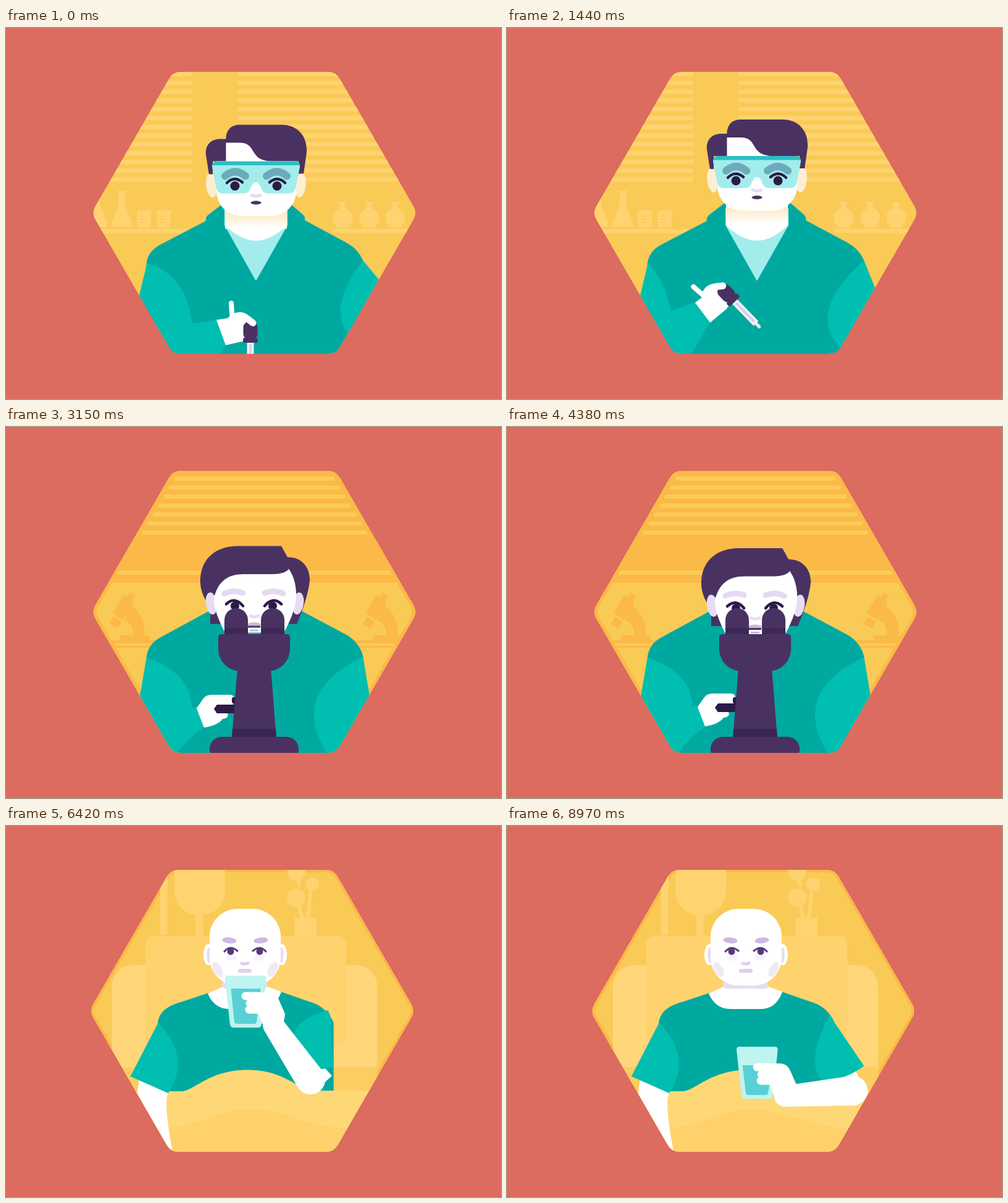
An HTML page with a canvas for the animation above (9000 ms loop, 800 px wide and 600 px high).

```html
<!DOCTYPE html>
<html lang="en">
<head>
<meta charset="utf-8">
<title>Lab story</title>
<style>
html, body { margin: 0; width: 100%; height: 100%; overflow: hidden; background: #dc6b60; }
canvas { display: block; }
</style>
</head>
<body>
<canvas id="stage" width="800" height="600"></canvas>
<script>
const ctx = document.getElementById('stage').getContext('2d');
const LOOP = 9000;
const C = {
  back: '#dc6b60', yellow: '#f9ca56', light: '#fed370', orange: '#fbb947',
  teal: '#00a9a0', mint: '#00beb0', hair: '#493262', ink: '#2e1a47',
  cyan: '#a2edec', lilac: '#e6dcf3', white: '#ffffff'
};

const smooth = u => u * u * (3 - 2 * u);
const lerp = (a, b, u) => a + (b - a) * u;
const ease = (t, from, to) => smooth(Math.min(1, Math.max(0, (t - from) / (to - from))));
const mix = (a, b, u) => a.map((v, i) => lerp(v, b[i], u));

function fill(color, d) {
  ctx.fillStyle = color;
  ctx.fill(new Path2D(d));
}
function line(color, width, d, cap = 'round') {
  ctx.strokeStyle = color;
  ctx.lineWidth = width;
  ctx.lineCap = cap;
  ctx.lineJoin = 'round';
  ctx.stroke(new Path2D(d));
}
function rect(color, x, y, w, h, r = 0) {
  ctx.fillStyle = color;
  ctx.beginPath();
  ctx.roundRect(x, y, w, h, r);
  ctx.fill();
}
function oval(color, x, y, rx, ry = rx, a = 0) {
  ctx.fillStyle = color;
  ctx.beginPath();
  ctx.ellipse(x, y, rx, ry, a, 0, 7);
  ctx.fill();
}
function group(x, y, deg, draw) {
  ctx.save();
  ctx.translate(x, y);
  ctx.rotate(deg * Math.PI / 180);
  draw();
  ctx.restore();
}
function mirror(axis, draw) {
  draw();
  ctx.save();
  ctx.translate(2 * axis, 0);
  ctx.scale(-1, 1);
  draw();
  ctx.restore();
}
// tapered limb between two round joints
function limb(color, x1, y1, r1, x2, y2, r2) {
  const a = Math.atan2(y2 - y1, x2 - x1);
  const k = Math.acos((r1 - r2) / Math.hypot(x2 - x1, y2 - y1));
  ctx.fillStyle = color;
  ctx.beginPath();
  ctx.arc(x1, y1, r1, a + k, a - k + 2 * Math.PI);
  ctx.arc(x2, y2, r2, a - k, a + k);
  ctx.fill();
}

function hexPath(cx, sx) {
  const p = new Path2D(), R = 263.3;
  const corner = i => [R * Math.cos(i * Math.PI / 3), R * Math.sin(i * Math.PI / 3)];
  p.moveTo(...mix(corner(5), corner(0), 0.5));
  for (let i = 0; i < 6; i++) p.arcTo(...corner(i), ...corner(i + 1), 22);
  p.closePath();
  const out = new Path2D();
  out.addPath(p, new DOMMatrix([sx, 0, 0, 1, cx, 299]));
  return out;
}

function rim(face, width) {
  ctx.strokeStyle = C.orange;
  ctx.lineWidth = width * 2;
  ctx.stroke(face);
}

// ---------- scientist with dropper ----------
function labShelf() {
  for (let i = 0; i < 13; i++) {
    const y = 71 + 14.2 * i;
    rect(C.light, 0, y, 301, 7);
    rect(C.light, 374, y, 400, 7);
  }
  rect(C.light, 0, 325, 294, 7);
  rect(C.light, 528, 325, 200, 7);
  for (const x of [147, 187]) {
    group(x, 263, 0, () => {
      fill(C.light, 'M-7 0H7V4H5V22L17 54Q18 59 14 59H-14Q-18 59-17 54L-5 22V4H-7Z');
    });
  }
  for (const x of [211, 243]) {
    fill(C.light, `M${x} 295h26l-3 5v19q0 4-4 4h-14q-4 0-4-4v-19z`);
    for (let i = 0; i < 3; i++) rect(C.yellow, x + 6, 303 + i * 5, i % 2 ? 9 : 6, 2);
  }
  for (const x of [544, 587, 629]) {
    oval(C.light, x, 307, 16);
    rect(C.light, x - 4.5, 282, 9, 14);
    rect(C.light, x - 6, 281, 12, 3, 1);
    rect(C.light, x - 10, 316, 20, 7, 2);
  }
}

function goggledHead() {
  mirror(404, () => oval('#fdeed2', 332, 246, 8.5, 20, -0.12));
  rect(C.white, 340, 175, 129, 120.5, [0, 0, 40, 40]);
  fill(C.hair, 'M328 228L323 196C322 180 332 171 346 171H355.5C355.5 157 364 148 377 148H445C472 148 487 167 486 192L481 227H473V207H428C404 206 402 193 395 184Q389 177 379 177H355.5V207H334V228Z');
  const lens = 'M342 207H466Q475 207 475 216L468 251Q466 259 457 259H424C409 259 414 241 404 241C394 241 399 259 384 259H351Q342 259 340 251L333 216Q333 207 342 207Z';
  fill(C.cyan, lens);
  ctx.save();
  ctx.clip(new Path2D(lens));
  rect('#2bbfc3', 330, 207, 150, 6.5);
  ctx.restore();
  mirror(404, () => {
    line('#6daabc', 12, 'M354 231Q370 217 387 231');
    line(C.ink, 4.5, 'M357 242Q369 230 382 241');
    oval(C.ink, 370, 247, 7.5);
  });
  line(C.lilac, 5, 'M397 262Q404 265 411 262');
  oval(C.hair, 404, 274, 8.5, 3);
}

function dropperHand(x, y, deg, cuff) {
  const a = deg * Math.PI / 180, cs = Math.cos(a), sn = Math.sin(a);
  const world = (u, v) => `${x + u * cs - v * sn} ${y + u * sn + v * cs}`;
  fill(C.white, `M${cuff[0]} ${cuff[1]}L${world(-28, -24)}L${world(-6, 14)}L${world(-18, 16)}L${cuff[2]} ${cuff[3]}Z`);
  group(x, y, deg, () => {
    line(C.white, 8, 'M-31-47L-29-20');
    fill(C.white, 'M-38-22L-28-30Q-15-36-4-28L0-10L-6 12Q-15 18-25 12Z');
    rect('#f5f1f8', -5.5, 15, 11, 51);
    rect('#dacfe6', -2, 20, 4, 42);
    rect('#f5f1f8', -2.5, 65, 5, 11, 2);
    rect(C.hair, -11.5, -17, 23, 29, 9);
    rect(C.hair, -12, 9, 24, 8, 3);
    line(C.white, 11, 'M-16-25L-5-22L4-15');
  });
}

// right arm: control, end; left arm: control, end, cuff top, cuff bottom
const lab = {
  right: [[514, 456, 560, 503], [455, 463, 521, 530]],
  left: [
    [290, 398, 301, 478, 340, 472, 355, 513],
    [280, 395, 294, 466, 323, 460, 341, 495],
    [230, 415, 240, 450, 287, 430, 317, 460]
  ],
  hand: [[395, 492, 0], [376, 474, -6], [339, 392, -78]]
};

function labScene(t) {
  const lift = ease(t, 0, 780), swing = ease(t, 780, 2050);
  const pose = ([a, b, c]) => mix(mix(a, b, lift), c, swing);
  rect(C.yellow, 0, 0, 800, 600);
  labShelf();
  fill(C.teal, 'M353 282L327 302Q322 306 323 312L250 350Q229 361 227 381L212 540H577V376Q569 357 550 347L483 311Q484 305 479 301L457 282Z');
  const r = mix(...lab.right, swing);
  fill(C.mint, `M577 376Q${r.join(' ')}V545H640V${452 + 150 * swing}Z`);

  fill(C.cyan, 'M353 292H455V319L404 409L353 319Z');
  fill(C.white, 'M354 285H454V319Q428 344 404 344Q380 344 354 319Z');
  const dy = 8.5 * (1 - ease(t, 0, 700));
  const shade = ctx.createLinearGradient(0, 294 + dy, 0, 316 + dy);
  shade.addColorStop(0, '#fdecca');
  shade.addColorStop(1, C.white);
  ctx.fillStyle = shade;
  ctx.fillRect(354, 290, 100, 26 + dy);
  group(0, dy, 0, goggledHead);

  const s = pose(lab.left), cuff = s.slice(4);
  fill(C.mint, `M228 380Q${s.slice(0, 4).join(' ')}L${cuff.join(' ')}L${cuff[2] - 0.6 * (545 - cuff[3])} 545H188Z`);
  dropperHand(...pose(lab.hand), cuff);
}

// ---------- scientist at microscope ----------
function smallScope(x) {
  group(x, 0, 0, () => {
    line(C.orange, 10, 'M204 270L199 279', 'butt');
    line(C.orange, 20, 'M198 277L181 307', 'butt');
    line(C.orange, 15, 'M181 311L174 322', 'butt');
    fill(C.orange, 'M202 289Q226 304 224 340H205Q207 317 191 313Z');
    rect(C.orange, 184, 337, 48, 8);
  });
}

function scopeHead() {
  fill(C.hair, 'M330 322V293C319 282 313 264 314 249C316 216 339 196 375 196H445L455 214C478 214 491 230 491 251Q488 280 470 322Z');
  mirror(402, () => oval(C.lilac, 332, 289, 9, 18, -0.15));
  fill(C.white, 'M336 280C343 253 358 241.5 384 241.5H432Q451 241 457 233Q469 250 469 276Q469 300 449 336H354Q335 300 336 280Z');
  mirror(400.5, () => {
    line('#e4daf1', 9, 'M353 273Q368 266 383 272');
    line(C.ink, 4.5, 'M356 290Q370 277 383 293');
    oval(C.ink, 370, 293, 7);
  });
  line(C.lilac, 5, 'M395 309Q401 312 408 309');
  oval('#c9bada', 401, 323, 11, 3.5);
  rect(C.hair, 391, 325, 20, 3);
  rect('#c9bada', 394, 331, 14, 3);
}

function scopeScene(t, face) {
  const pale = '#fccb58';
  rect(C.yellow, 0, 0, 800, 600);
  rect(C.orange, 0, 0, 800, 252);
  for (let i = 0; i < 7; i++) {
    const x = 272 - 8.7 * i;
    rect(pale, x, 80 + 14.5 * i, 803 - 2 * x, 7, 3);
  }
  rect(pale, 0, 232, 800, 7);
  smallScope(0);
  smallScope(409);
  rect(C.orange, 0, 345, 800, 5);
  rect(C.orange, 0, 354, 800, 3);
  rim(face, 5);

  fill(C.teal, 'M331 296L250 340Q229 351 227 373L210 540H595L577 371Q572 350 552 337L475 296Z');
  fill(C.mint, 'M577 372Q455 430 521 532H604Z');
  const turn = Math.sin((t - 4380) / 260);
  fill(C.mint, `M227 373Q299 398 300 453L309 ${452 + turn}L321 ${484 + turn}Q297 500 274 530H200Z`);

  group(0, 4 * Math.sin((t - 4380) / 600), 0, scopeHead);

  group(0, 2 * turn, 0, () => {
    fill(C.white, 'M308 453L319 437Q323 431 333 431H362Q369 431 369 438L366 448H340V461H358Q361 469 350 470Q342 481 320 484Z');
    fill(C.ink, 'M341 447H374V461H341L336 454Z');
  });
  rect(C.ink, 365, 437, 8, 10, 3);

  for (const x of [353, 412]) {
    rect(C.hair, x, 293, 38, 44, [19, 19, 0, 0]);
    rect('#3d2856', x, 325, 38, 10);
  }
  fill(C.hair, 'M374 390H428L437 505H365Z');
  fill('#3b2753', 'M366 488H436L437 501H365Z');
  rect(C.hair, 343, 335, 116, 60, [5, 5, 36, 36]);
  rect(C.hair, 329, 501, 144, 40, 20);
}

// ---------- patient on the sofa ----------
function room(face) {
  rect(C.yellow, 0, 0, 800, 600);
  rim(face, 4);
  rect(C.light, 249, 60, 12, 116);
  rect(C.light, 272, 40, 82, 104, 38);
  rect(C.light, 306, 140, 13, 38);
  oval(C.light, 469, 74, 14.5);
  oval(C.light, 495, 94, 11);
  oval(C.light, 469, 116, 15);
  line(C.light, 6, 'M472 85L474 96M473 126L479 150M492 108L488 150');
  rect(C.light, 466, 148, 36, 30);
  rect('#ffd679', 171, 225, 429, 190, 34);
  rect('#fccd60', 171, 390, 429, 45);
  rect('#fed26d', 225, 178, 325, 174, 13);
}

function patientHead() {
  const violet = '#573a7e', soft = '#ddd0ec';
  mirror(386.5, () => {
    oval(C.white, 327, 208, 8, 17);
    oval(C.lilac, 328, 209, 3.5, 13);
  });
  rect(C.white, 329, 134, 115, 124, 45);
  mirror(386.5, () => {
    oval('#f0eaf7', 342, 232, 7, 13, -0.5);
    oval('#f7f3fb', 364, 213, 9, 5);
    oval('#cdb9e3', 361, 185, 11.5, 4.8, 0.1);
    line(violet, 3, 'M353 203Q362 192 374 202');
    oval(violet, 363, 203, 5.5);
  });
  line(soft, 5, 'M381 222Q386 224 391 222');
  rect(soft, 375, 231, 22, 6.5, 3);
}

// control, cuff inner, cuff outer, elbow control, wrist
const resting = [
  [312, 377, 281, 428, 220, 412, 290, 475, 308],
  [300, 375, 262, 432, 201, 405, 254, 448, 270]
];

function restingArm(t) {
  const [qx, qy, ax, ay, bx, by, ex, ey, wx] = mix(...resting, ease(t, 5500, 5950));
  fill(C.white, `M${bx + 14} ${by + 5}L${ax} ${ay}Q${ex} ${ey} ${wx} 530H258L${bx + 11} 434Z`);
  fill(C.mint, `M246 318Q${qx} ${qy} ${ax} ${ay}L${bx} ${by}Z`);
}

function glass(level) {
  fill('#bff4f0', 'M4 0H62Q67 0 66.5 5L59 79Q58 84 53 84H14Q9 84 8 79L0 5Q0 0 4 0Z');
  fill('#58d0d5', `M9.5 ${level}H57.5L51 75Q50 78 47 78H20Q16 78 15 75Z`);
}

function gripHand() {
  fill(C.white, 'M38 27H72Q82 28 87 39L97 62L93 86L60 78L54 62L40 58Z');
  line(C.white, 13, 'M33 33H52M40 45H56M39 55H56');
}

function openHand() {
  limb(C.white, 76, 78, 15, 78, 66, 12);
  line(C.white, 10, 'M72 74L57 63M78 70L86 33M87 72L101 40');
}

// glass, elbow, shoulder, sleeve control, cuff inner, cuff outer
const arm = {
  reach: [494, 275, 522, 438, 528, 318, 457, 377, 498, 427, 549, 383],
  away: [590, 230, 595, 415, 528, 312, 470, 365, 505, 415, 575, 365],
  sip: [354, 242, 492, 410, 520, 298, 422, 326, 500, 390, 528, 390],
  tilt: [353, 234, 584, 388, 522, 300, 480, 345, 505, 390, 580, 354],
  rest: [371, 357, 559, 428, 522, 305, 479, 384, 512, 414, 577, 388]
};

function drinkingArm(t) {
  let v = mix(arm.reach, arm.away, ease(t, 5520, 5800));
  v = mix(v, arm.sip, ease(t, 5800, 6390));
  v = mix(v, arm.tilt, ease(t, 6560, 7050));
  v = mix(v, arm.rest, ease(t, 8350, 8830));
  const [gx, gy, ex, ey, sx, sy, qx, qy, ax, ay, bx, by] = v;
  const mx = (ax + bx) / 2, my = (ay + by) / 2;
  line(C.white, 38, `M${mx} ${my}L${ex} ${ey}`, 'butt');
  fill(C.mint, `M${sx} ${sy}Q${qx} ${qy} ${ax} ${ay}Q${lerp(mx, ex, 0.3)} ${lerp(my, ey, 0.3)} ${bx} ${by}L${sx + 4} ${sy + 8}Z`);
  limb(C.white, ex, ey, 24, gx + 78, gy + 80, 17);
  group(gx, gy, 0, () => {
    if (t < 5800) return openHand();
    glass(21 + 9 * ease(t, 6900, 8300));
    gripHand();
  });
}

function sofaScene(t, face) {
  room(face);
  fill(C.teal, 'M327 270L285 284C255 292 247 304 245 320L262 431H529.5V318Q517 291 490 284L444 268Z');
  fill(C.white, 'M326 271L352 259V240H420V259L445 268Q435 296 410 296H361Q337 296 326 271Z');
  rect(C.lilac, 349, 250, 73, 13, 5);
  fill('#fed877', 'M150 429H283C305 429 327 394.5 390 394.5C453 394.5 470 428 500 428H660V545H150Z');
  fill('#fed16b', 'M150 488H265C315 485 340 458 395 458C453 458 485 488 550 488H660V545H150Z');
  restingArm(t);
  const up = 12 * ease(t, 6560, 6980) - 5 * ease(t, 6980, 7400) - 7 * ease(t, 8380, 8760);
  group(0, -up, 0, patientHead);
  drinkingArm(t);
}

const scenes = [labScene, scopeScene, sofaScene];
const flips = [
  { start: 2286, span: 600, depth: 19 },
  { start: 5100, span: 600, depth: 32 }
];

function render(t) {
  rect(C.back, 0, 0, 800, 600);
  let index = 0, cx = 401.5, sx = 1, edge = 0;
  flips.forEach((f, i) => {
    if (t < f.start) return;
    const p = ease(t, f.start, f.start + f.span);
    const side = p < 0.5 ? -1 : 1;
    index = p < 0.5 ? i : i + 1;
    sx = Math.max(0.02, Math.abs(Math.cos(Math.PI * p)));
    edge = side * f.depth * Math.sin(Math.PI * p);
    if (i === 1) cx = lerp(401.5, 398, p);
  });
  const mid = cx - edge / 2;
  ctx.fillStyle = C.orange;
  const steps = Math.ceil(Math.abs(edge) / 2);
  for (let i = 1; i <= steps; i++) ctx.fill(hexPath(mid + edge * i / steps, sx));
  const face = hexPath(mid, sx);
  ctx.save();
  ctx.clip(face);
  scenes[index](t, face);
  ctx.restore();
}

function frame(now) {
  render(now % LOOP);
  requestAnimationFrame(frame);
}
render(0);
requestAnimationFrame(frame);
</script>
</body>
</html>
```
